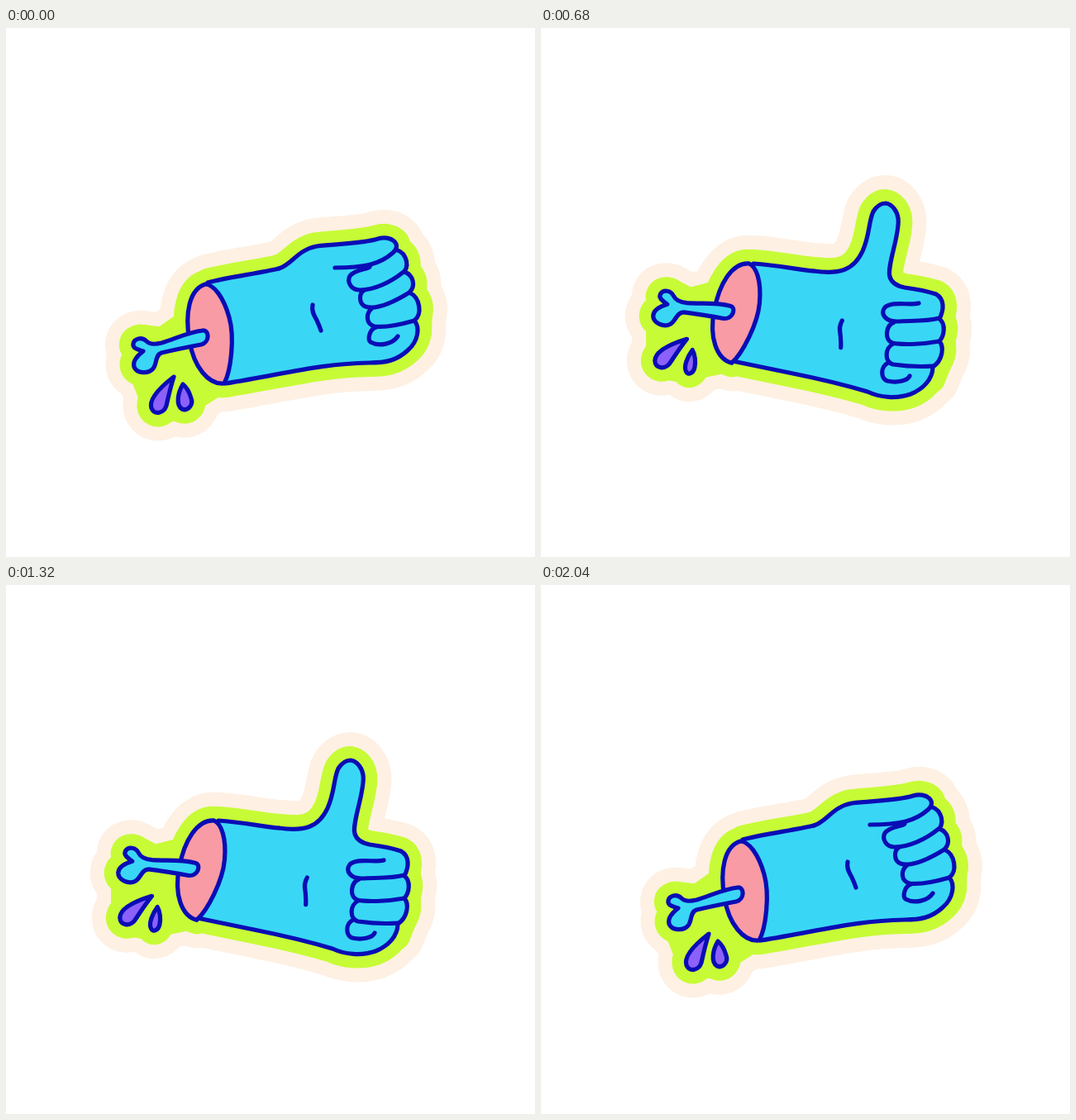
An HTML page with a canvas for the animation above (2.08 s loop, 640x640 px).

```html
<!DOCTYPE html>
<html lang="en">
<head>
<meta charset="utf-8">
<title>Thumbs up</title>
<style>
  html, body { margin: 0; width: 100%; height: 100%; overflow: hidden; background: #fff; }
  canvas { display: block; }
</style>
</head>
<body>
<canvas id="stage" width="640" height="640"></canvas>
<script>
const ctx = document.getElementById('stage').getContext('2d');
const INK = '#0a0db5', SKIN = '#39d7f5', FLESH = '#f99ba4', DROP = '#8c60fa', LIME = '#c7fb36', CREAM = '#fef0e3';
const LOOP = 2080;

// Thumb as bezier points: a start, then four cubic segments.
const PIVOT = [385, 285];
const FOLDED = [[330,291], [345,287],[353,268],[376,264], [400,261],[432,261],[450,255], [466,250],[480,262],[468,272], [452,286],[434,290],[398,290]];
const RAISED = [[330,291], [350,287],[363,280],[366,255], [370,232],[362,215],[363,200], [364,180],[390,178],[398,200], [402,222],[401,262],[414,273]];

const upright = {
  top: 'M244 308C270 301 305 297 330 291',
  web: 'L414 273',
  rest: 'C430 275 450 272 468 268C482 268 489 284 482 295C493 299 496 312 488 320C501 326 504 346 494 354C501 362 499 379 486 390C472 403 458 405 440 405C380 406 340 418 266 430',
  knuckles: 'M476 270L499 338L498 368',
  fingers: 'C442 293 424 290 416 300C412 308 418 317 428 317C445 317 465 308 481 295' +
    'M434 317C426 321 427 334 435 337C450 342 475 328 488 320' +
    'M443 339C435 345 435 358 446 361C460 363 480 358 494 354' +
    'M448 362C440 364 437 376 441 380C452 386 468 382 474 373'
};
const tilted = {
  top: 'M257 285C285 287 310 292 330 294',
  thumb: 'M330 294C360 298 378 294 389 270C398 250 396 235 402 222C407 214 413 212 417 212C425 213 431 222 432 230C435 248 418 288 422 301',
  web: 'L422 301',
  rest: 'C424 308 430 312 440 314C455 316 466 318 478 322C488 328 488 340 482 352C490 358 488 372 482 379C488 386 486 402 474 410C474 425 462 437 447 443C430 449 410 447 395 440C365 431 340 425 300 417L232 403',
  knuckles: 'M482 325L486 360L484 395L472 425',
  fingers: 'M457 333C445 336 425 330 416 338C410 346 417 355 430 355C450 354 467 355 482 351' +
    'M427 356C417 360 415 377 425 381C440 384 465 382 482 379' +
    'M426 382C416 387 415 404 426 407C440 409 460 410 474 409' +
    'M420 405C410 410 411 424 419 427C432 430 444 426 446 421'
};

const CUT = 'M241 310C222 316 216 345 222 378C227 410 245 432 264 430C272 415 277 375 270 350C263 325 251 310 241 310Z';
const BONE = 'M238 366C220 368 205 376 188 381C180 383 174 383 170 379C164 373 155 376 154 382C153 388 160 389 166 391C158 397 153 403 155 410C158 418 172 419 178 412C183 406 180 396 188 393C205 389 220 386 236 383C247 380 246 365 238 366Z';
const BIG_DROP = 'M203 422C190 432 172 448 176 460C180 469 191 466 194 457C196 448 198 438 203 422Z';
const THIN_DROP = 'M214 432C211 442 211 455 216 459C220 463 225 458 224 451C223 444 219 436 214 432Z';
const WIDE_DROP = 'M214 431C208 441 205 456 213 461C220 464 227 456 224 448C222 441 219 435 214 431Z';
const WRINKLE = 'M371 335C369 345 375 350 377 356C379 360 380 363 381 366';
// Joins bone, drops and arm so that the border runs smoothly round them.
const BRIDGE = 'M163 408L181 455M184 462L218 456M222 449L255 428M203 422L225 390M165 376L190 379L224 355';

const tilt = new DOMMatrix().translate(257, 287).rotate(20.6).translate(-247, -310);
const mix = (a, b, u) => a + (b - a) * u;

// Swing each point around the pivot from folded (0) to raised (1).
function thumbPath(u) {
  const polar = ([x, y]) => [Math.hypot(x - PIVOT[0], y - PIVOT[1]), Math.atan2(y - PIVOT[1], x - PIVOT[0])];
  const pts = FOLDED.map((p, i) => {
    const [r0, a0] = polar(p), [r1, a1] = polar(RAISED[i]);
    const r = mix(r0, r1, u), a = mix(a0, a1, u);
    return `${PIVOT[0] + r * Math.cos(a)} ${PIVOT[1] + r * Math.sin(a)}`;
  });
  return `M${pts[0]}C${pts.slice(1).join(' ')}`;
}

function paint(d, fill, line = INK) {
  const path = d instanceof Path2D ? d : new Path2D(d);
  if (fill) { ctx.fillStyle = fill; ctx.fill(path); }
  if (line) { ctx.strokeStyle = line; ctx.stroke(path); }
}

function draw(u, isTilted) {
  const hand = isTilted ? tilted : upright;
  const thumb = isTilted ? tilted.thumb : thumbPath(u);
  const fingers = isTilted ? tilted.fingers : `M${mix(440, 453, u)} ${mix(287, 286, u)}${upright.fingers}`;
  const smallDrop = u < 0.5 ? WIDE_DROP : THIN_DROP;
  const palm = hand.top + hand.web + hand.rest;
  const place = d => {
    const path = new Path2D();
    path.addPath(new Path2D(d), isTilted ? tilt : new DOMMatrix());
    return path;
  };

  ctx.clearRect(0, 0, 640, 640);
  ctx.lineCap = ctx.lineJoin = 'round';
  const shapes = [palm, thumb, hand.knuckles, ...[CUT, BONE, BIG_DROP, smallDrop, BRIDGE].map(place)];
  for (const [color, width] of [[CREAM, 68], [LIME, 34]]) {
    ctx.lineWidth = width;
    for (const d of shapes) paint(d, color, color);
  }

  ctx.lineWidth = 5.2;
  paint(palm, SKIN, null);
  paint(hand.web.replace('L', 'M') + hand.rest);
  paint(fingers);
  paint(thumb + 'L400 310L345 305Z', SKIN, null);
  paint(hand.top);
  paint(thumb);
  paint(place(CUT), FLESH);
  paint(place(BONE), SKIN);
  paint(place(BIG_DROP), DROP);
  paint(place(smallDrop), DROP);
  paint(place(WRINKLE));
}

const SWING = [0, 0.25, 0.6, 1.06, 1];

function frame(now) {
  const t = now % LOOP;
  let step = 4;
  if (t < 480) step = Math.floor(t / 120);
  else if (t >= 1800) step = Math.max(0, 4 - Math.floor((t - 1800) / 60));
  const isTilted = t >= 680 && t < 1800 && Math.floor((t - 680) / 160) % 2 === 0;
  draw(SWING[step], isTilted);
  requestAnimationFrame(frame);
}
frame(0);
</script>
</body>
</html>
```
